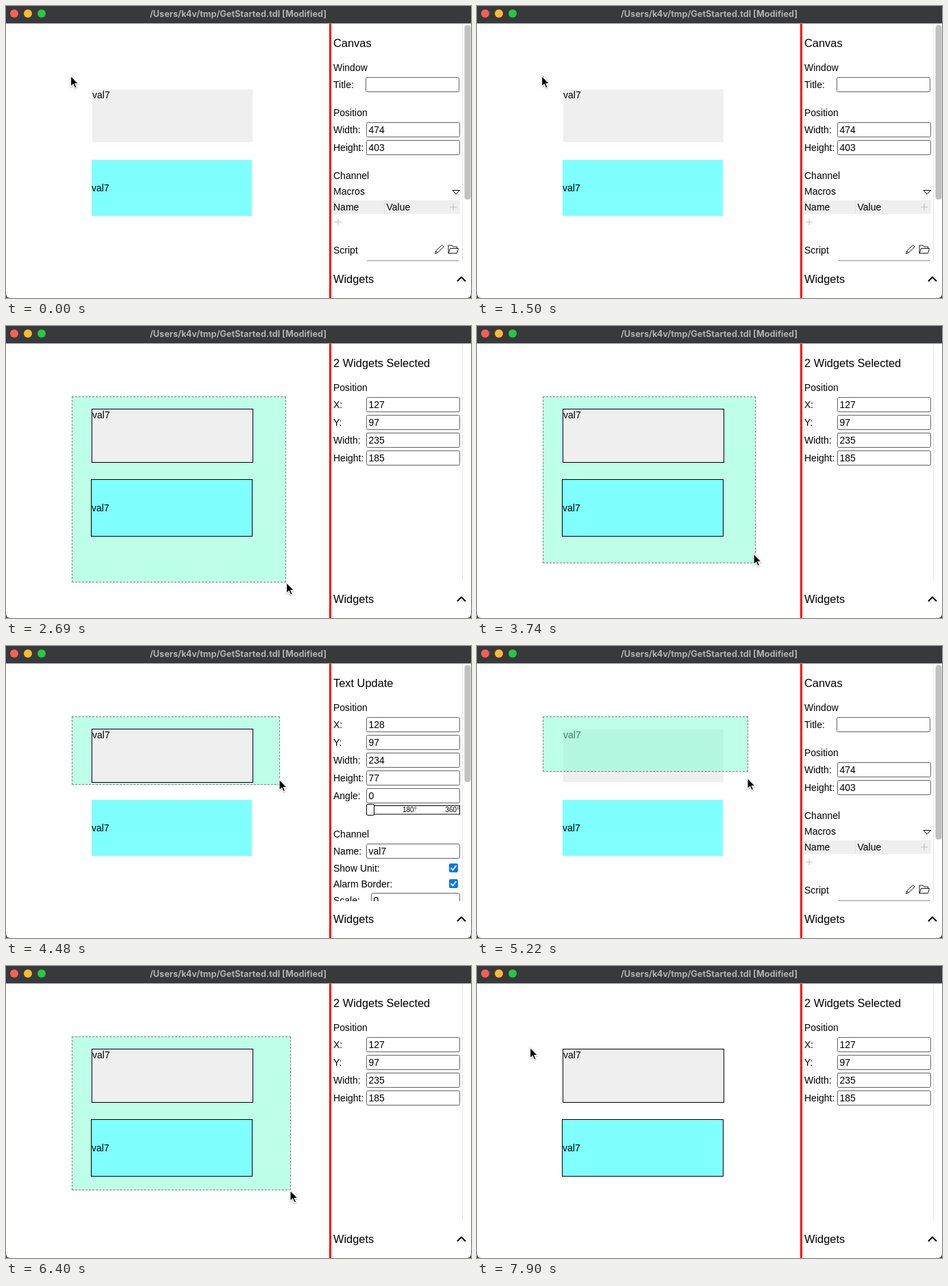
An HTML page for the animation above (8 s loop, 679x427 px).

```html
<!DOCTYPE html>
<html lang="en">
<head>
<meta charset="utf-8">
<title>Widget selection</title>
<style>
  html, body { margin: 0; width: 100%; height: 100%; overflow: hidden; background: #4a4a4a; }
  #win { position: absolute; left: 0; top: 0; width: 679px; height: 427px; overflow: hidden;
    background: #fff; border-radius: 0 0 6px 6px; }
  #win, text { font: 14px "Liberation Sans", Arial, sans-serif; }
  #win > * { position: absolute; }
  .widget { width: 234px; z-index: 1; }
  .widget.on { outline: 1px solid #000; z-index: 3; }
  #w1 { left: 126px; top: 122px; height: 77px; line-height: 16px; background: #efefef; }
  #w2 { left: 125px; top: 225px; height: 82px; line-height: 82px; background: #80ffff; }
  #band { left: 96px; top: 103px; z-index: 2; box-sizing: border-box;
    background: #7fffd4; border: 1px dashed #000; opacity: .5; }
  #ui { left: 0; top: 0; z-index: 4; }
  #ui .big { font-size: 16.4px; }
  #ui .small { font-size: 10px; }
  #ui .title { font: 700 12.7px Inter, sans-serif; fill: #b1b2b3; }
  .field { fill: #fff; stroke: #626262; }
  .line { fill: none; stroke: #000; }
  .plus { fill: none; stroke: #bdbdbd; }
  .thumb { fill: #c1c1c1; }
  #cursor { left: 0; top: 0; z-index: 5; overflow: visible;
    filter: drop-shadow(0 1px 1px rgba(0,0,0,.3)); }
</style>
</head>
<body>
<div id="win">
  <div id="w1" class="widget">val7</div>
  <div id="w2" class="widget">val7</div>
  <div id="band"></div>
  <svg id="ui" width="679" height="427">
    <clipPath id="view"><rect x="475" y="26" width="204" height="347"/></clipPath>
    <rect width="679" height="25.5" fill="#37393a"/>
    <circle cx="12" cy="11" r="6" fill="#ff5f57"/>
    <circle cx="32" cy="11" r="6" fill="#febc2e"/>
    <circle cx="52" cy="11" r="6" fill="#28c840"/>
    <text class="title" x="339" y="15.5" text-anchor="middle">/Users/k4v/tmp/GetStarted.tdl [Modified]</text>
    <rect x="472" y="26" width="3" height="401" fill="#f00"/>
    <path d="M666.5 26V373" stroke="#e4e4e4"/>
    <g clip-path="url(#view)">
      <g id="canvas"></g>
      <g id="single"></g>
      <g id="multi"></g>
    </g>
    <text class="big" x="478" y="405">Widgets</text>
    <path class="line" d="M659 402.5L665 396.5L671 402.5" stroke-width="2"/>
  </svg>
  <svg id="cursor" width="14" height="22">
    <path d="M0 0V16L3.7 12.6L6.1 18L8.7 16.9L6.4 11.6H11.2Z" stroke="#fff" stroke-width="1.2"/>
  </svg>
</div>
<script>
const $ = id => document.getElementById(id);

// Panel pieces; y is the vertical centre of the row.
const label = (s, y, x = 478) => `<text x="${x}" y="${y + 5}">${s}</text>`;
const head = s => `<text class="big" x="478" y="60">${s}</text>`;
const box = (y, x = 526, w = 137) =>
  `<rect class="field" x="${x + .5}" y="${y - 10.5}" width="${w - 1}" height="21" rx="2"/>`;
const field = (name, value, y) => label(name, y) + box(y) + label(value, y, 529.5);
const check = (name, y) => label(name, y) +
  `<rect x="647" y="${y - 6.5}" width="13" height="13" rx="2" fill="#0075ff"/>
   <path d="M649.5 ${y}l3 3l5-6.5" fill="none" stroke="#fff" stroke-width="2"/>`;
const plus = (x, y) => `<path class="plus" d="M${x - 5} ${y}h10M${x} ${y - 5}v10"/>`;
const thumb = bottom =>
  `<rect class="thumb" x="669.5" y="28" width="9" height="${bottom - 28}" rx="4"/>`;
const place = (x, y, w, h) => label("Position", 90) +
  field("X:", x, 115) + field("Y:", y, 141) + field("Width:", w, 167) + field("Height:", h, 193);

$("canvas").innerHTML = head("Canvas") + label("Window", 90) +
  label("Title:", 115) + box(115, 525) +
  label("Position", 156) + field("Width:", 474, 181) + field("Height:", 403, 207) +
  label("Channel", 248) + label("Macros", 271) +
  `<path class="line" d="M652 269.5H662.5L657.2 275.3Z"/>
   <rect x="476" y="284" width="187" height="20" fill="#efefef"/>
   <path d="M552.5 284v20" stroke="#e2e2e2"/>` +
  label("Name", 294) + label("Value", 294, 555.5) + plus(653, 294) + plus(485, 316) +
  label("Script", 357) +
  `<path d="M527 372.5H661.5" stroke="#909090"/>
   <path class="line" d="M626.5 362l1.2-4l9-8.5l2.6 2.6l-9 8.6zM627.7 358l2.6 2.7" stroke-width=".9"/>
   <path class="line" d="M646 361.5v-11.5h5l1.5 2h6v2.5M646 361.5l2.5-7h12l-2 7z" stroke-width=".9"/>` +
  thumb(283);

$("single").innerHTML = head("Text Update") + place(128, 97, 234, 77) + field("Angle:", 0, 219) +
  `<rect class="line" x="526.5" y="233.5" width="136" height="12.5"/>
   <rect x="526.5" y="231.5" width="11" height="16" rx="2" fill="#fff" stroke="#000"/>
   <text class="small" x="579" y="243">180°</text>
   <text class="small" x="641.5" y="243">360°</text>` +
  label("Channel", 275) + field("Name:", "val7", 300) +
  check("Show Unit:", 324.5) + check("Alarm Border:", 347.5) +
  label("Scale:", 372) + box(372, 533, 130) + label("0", 372, 536.5) + thumb(199);

$("multi").innerHTML = head("2 Widgets Selected") + place(127, 97, 235, 185);

// step, pointer x, pointer y, band right, band bottom
const path = [
  [0, 94.5, 102, 98, 105], [1, 94.5, 102, 98, 105],
  [2, 125, 140, 110, 120], [3, 192, 217, 168, 188], [5, 343, 358, 324, 345],
  [6, 383, 373, 372, 366], [7, 404, 375, 402, 374], [9, 415, 375, 416, 376],
  [12, 415, 375, 416, 376], [13, 412, 368, 414, 373], [15, 404, 333, 407, 347],
  [18, 398, 245, 399, 262], [20, 399, 195, 400, 203], [23, 394, 150, 395, 156],
  [25, 395, 193, 396, 184], [28, 403, 217, 402, 213], [29, 406, 230, 405, 224],
  [32, 415, 322, 415, 318], [33, 415, 328, 416, 328], [38, 415, 328, 416, 328],
  [39, 405, 322, 416, 328], [43, 77.5, 119, 416, 328]
];
const LOOP = 8000, START = 1500, STEP = 148.4, LAST = 43, RELEASE = 39;

function at(k) {
  const i = Math.max(1, path.findIndex(p => p[0] >= k));
  const a = path[i - 1], b = path[i], f = (k - a[0]) / (b[0] - a[0]);
  return a.map((v, j) => v + (b[j] - v) * f);
}

const show = (id, on) => $(id).style.display = on ? "" : "none";

function draw(t) {
  const k = Math.min(LAST, Math.floor((t - START) / STEP));
  const [, x, y, right, bottom] = at(Math.max(0, k));
  const first = k >= 0 && right >= 360 && bottom >= 200;
  const both = first && bottom >= 308;

  $("cursor").style.transform = `translate(${x}px, ${y}px)`;
  $("band").style.width = Math.round(right) - 96 + "px";
  $("band").style.height = Math.round(bottom) - 103 + "px";
  show("band", k >= 0 && k < RELEASE);
  $("w1").classList.toggle("on", first);
  $("w2").classList.toggle("on", both);
  show("canvas", !first);
  show("single", first && !both);
  show("multi", both);
}

const began = performance.now();
function tick() {
  draw((performance.now() - began) % LOOP);
  requestAnimationFrame(tick);
}
tick();
</script>
</body>
</html>
```
